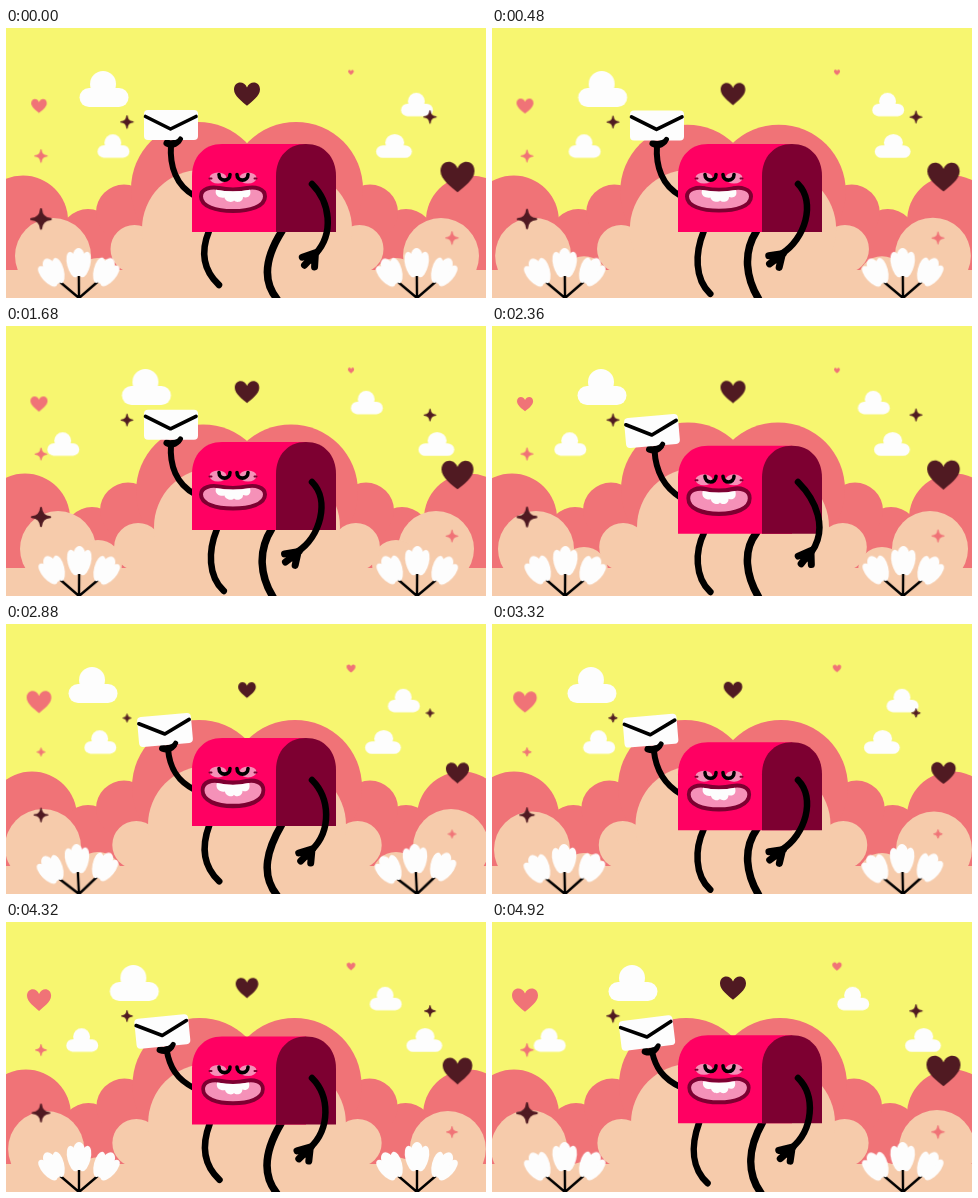
Animation of 480 by 270 pixels, one loop 4960 ms. Source, as an HTML page:

```html
<!DOCTYPE html>
<html lang="en">
<head>
<meta charset="utf-8">
<title>Mailbox with a letter</title>
<style>
  html, body { margin: 0; width: 100%; height: 100%; overflow: hidden; background: #f7f670; }
  svg { display: block; width: 100vw; height: 100vh; }
  .dark { fill: #501a22; stroke: #501a22; }
  .coral { fill: #f07377; stroke: #f07377; }
  .cream { fill: #f6cbab; }
  .white { fill: #fdfdfd; }
  .ink { fill: none; stroke: #000; stroke-linecap: round; stroke-linejoin: round; }
  .right, .left, .shrink, .grow, .sway { animation: 4960ms linear infinite; }
  .right { animation-name: right; }
  .left { animation-name: left; }
  .shrink { animation-name: shrink; }
  .grow { animation-name: grow; }
  .sway { animation-name: sway; animation-timing-function: ease-in-out; }
  @keyframes right {
    0% { transform: translateX(0); }
    33.4% { transform: translateX(43.5px); }
    47.6% { transform: translateX(12px); }
    59% { transform: translateX(-13px); }
    75.8% { transform: translateX(18.5px); }
    99.2%, 100% { transform: translateX(43px); }
  }
  @keyframes left {
    0%, 66.67% { transform: translateX(0); }
    33.33%, 100% { transform: translateX(-51px); }
  }
  @keyframes shrink {
    0% { transform: scale(1); }
    18.5% { transform: scale(.9); }
    33.9% { transform: scale(.94); }
    47.6% { transform: scale(.96); }
    58.1% { transform: scale(.68); }
    75.8% { transform: scale(.75); }
    99.2%, 100% { transform: scale(1); }
  }
  @keyframes grow {
    0% { transform: scale(.6); }
    18.5% { transform: scale(.7); }
    33.9% { transform: scale(.66); }
    47.6% { transform: scale(.62); }
    58.1% { transform: scale(.95); }
    75.8% { transform: scale(.86); }
    99.2%, 100% { transform: scale(1); }
  }
  @keyframes sway {
    0%, 18.5%, 100% { transform: rotate(-.5deg); }
    33.9%, 47.6%, 75.8% { transform: rotate(.5deg); }
    58.1% { transform: rotate(-3deg); }
  }
</style>
</head>
<body>
<svg viewBox="0 0 480 270" preserveAspectRatio="none">
  <defs>
    <path id="heart" stroke="none" d="M0 .9C-.35 .6-1 .15-1-.35C-1-1-.22-1.08 0-.5C.22-1.08 1-1 1-.35C1 .15 .35 .6 0 .9Z"/>
    <path id="star" stroke-width=".2" stroke-linejoin="round" d="M0-.9Q.06-.06 .9 0Q.06 .06 0 .9Q-.06 .06-.9 0Q-.06-.06 0-.9Z"/>
    <g id="cloud">
      <rect x="-24.5" y="-1" width="49" height="19" rx="9.5"/>
      <circle cx="-1" cy="-5" r="13"/>
    </g>
    <g id="tulip">
      <ellipse rx="7" ry="14"/>
      <ellipse cx="-6.5" cy="1" rx="5.5" ry="13" transform="rotate(-14)"/>
      <ellipse cx="6.5" cy="1" rx="5.5" ry="13" transform="rotate(14)"/>
      <circle cy="5" r="9"/>
    </g>
    <g id="bunch">
      <path class="ink" stroke-width="2.4" d="M0 0V-22M0 0L-21-18M0 0L21-18"/>
      <use href="#tulip" y="-36"/>
      <use href="#tulip" transform="translate(-27 -27) rotate(-28)"/>
      <use href="#tulip" transform="translate(27 -27) rotate(28)"/>
    </g>
    <g id="back">
      <circle id="b0" r="45"/><circle id="b1" r="28"/><circle id="b2" r="28"/><circle id="b3" r="67"/>
    </g>
    <g id="front">
      <circle id="c0" r="38"/><circle id="c1" r="24"/><circle id="c2" r="24"/><circle id="c3" r="59"/>
    </g>
  </defs>

  <rect width="480" height="270" fill="#f7f670"/>
  <g class="coral" style="stroke:none">
    <use href="#back"/><use href="#back" transform="matrix(-1 0 0 1 482 0)"/>
    <rect y="208" width="480" height="62"/>
  </g>
  <g class="cream">
    <use href="#front"/><use href="#front" transform="matrix(-1 0 0 1 482 0)"/>
    <rect x="132" y="222" width="218" height="48"/>
    <rect x="186" y="190" width="110" height="80"/>
    <rect y="242" width="480" height="28"/>
  </g>

  <g class="white">
    <g transform="translate(98 61)"><use class="right" href="#cloud"/></g>
    <g class="right"><use href="#cloud" transform="translate(388 118) scale(-.73 .66)"/></g>
    <g class="left"><use href="#cloud" transform="translate(107.5 118) scale(.65)"/></g>
    <g class="left"><use href="#cloud" transform="translate(411 76.5) scale(.65)"/></g>
  </g>
  <g id="sparks"></g>
  <g class="white">
    <g transform="translate(73 270)"><use class="sway" href="#bunch"/></g>
    <g transform="translate(411 270)"><use class="sway" href="#bunch"/></g>
  </g>

  <path id="legL" class="ink" stroke-width="6.5"/>
  <path id="legR" class="ink" stroke-width="7.5"/>
  <path id="armL" class="ink" stroke-width="6"/>
  <g id="letter">
    <path class="ink" stroke-width="7" d="M161 115Q167 118 172 113"/>
    <rect class="white" x="138" y="82" width="54" height="30" rx="4"/>
    <path class="ink" stroke-width="3.6" d="M139.5 88.5L164.5 101L190 88.5"/>
    <path class="ink" stroke-width="5" d="M166 115Q172 115 174.5 111"/>
  </g>

  <g id="body">
    <path fill="#ff0062" d="M186 204V148C186 129 198 116 216 116H300V204Z"/>
    <path fill="#7d0031" d="M270 204V148C270 129 282 116 300 116C318 116 330 129 330 148V204Z"/>
    <g fill="#f591b8">
      <ellipse cx="212" cy="150" rx="8.5" ry="5.5"/>
      <ellipse cx="242" cy="150" rx="8.5" ry="5.5"/>
    </g>
    <path class="ink" style="stroke:#7d0031" stroke-width="2" d="M203.5 150.5H205.500M248.500 150.500H250.500"/>
    <path class="ink" stroke-width="3.6" d="M213 146.500C213 154 224 154 224 146.500M231 146.500C231 154 242 154 242 146.500"/>
    <g id="mouth">
      <path fill="#f591b8" stroke="#7d0031" stroke-width="4" d="M-32-2C-32-10-22-12-14-10.500Q0-7.500 14-10.500C22-12 32-10 32-2C32 8 17 12.500 0 12.500C-17 12.500-32 8-32-2Z"/>
      <path class="white" d="M-17-8.700Q0-5.700 17-8.700C19-2 14 0 10-1.500C10 4 3 4.500 1 2C-1 5-8 3-8.500-1C-12 0-19-2-17-8.700Z"/>
    </g>
  </g>

  <path id="armR" class="ink" stroke-width="6.5"/>
  <path id="hand" class="ink" stroke-width="7" d="M4-7L-9-3M3-5L-7 5M4-4L3 7M5-7L0 0"/>
</svg>
<script>
const LOOP = 4960, STEP = 40, BEAT = LOOP / 7, TAU = Math.PI * 2;
const TIMES = [0, 920, 1680, 2360, 2880, 3760, 4920];
const $ = id => document.getElementById(id);
const set = (id, attrs) => {
  for (const k in attrs) $(id).setAttribute(k, attrs[k]);
};

// Smooth curve through the values at TIMES, without overshoot.
function track(...v) {
  const slope = i => (v[i + 1] - v[i]) / (TIMES[i + 1] - TIMES[i]);
  const tangent = i => {
    if (i === 0 || i === v.length - 1) return 0;
    const a = slope(i - 1), b = slope(i);
    return a * b <= 0 ? 0 : 2 * a * b / (a + b);
  };
  return t => {
    let i = 0;
    while (i < v.length - 2 && t > TIMES[i + 1]) i++;
    const w = TIMES[i + 1] - TIMES[i];
    const u = Math.min(1, (t - TIMES[i]) / w), n = 1 - u;
    return v[i] * n * n * (1 + 2 * u) + v[i + 1] * u * u * (3 - 2 * u)
      + w * u * n * (tangent(i) * n - tangent(i + 1) * u);
  };
}

const hillX = track(17, 26, 19, 20, 26, 18, 22);
const bumpX = track(118, 126, 122, 119, 118, 117, 120);
const peakX = track(192, 198, 197, 196, 193, 193, 194);
const peakY = track(161, 166, 165.5, 163.5, 163, 163, 163);
const knollX = track(47, 36, 52, 44, 37, 43, 37);
const knollY = track(228, 227, 223, 223, 223, 228, 226);
const moundY = track(254, 249, 238, 245, 252, 254, 264);
const domeX = track(195, 200, 207, 204, 201, 204, 198);
const letterX = track(0, 0, 0, -5, -6, -7, -10);
const letterY = track(0, 1, 1.8, 8, 9, 10.5, 14);
const tilt = track(0, 0, 0, -5, -5, -4.5, -7);
const grin = track(1, 1, 1, .96, .95, .94, .93);
const grinY = track(1, .95, .96, 1.08, 1.08, .96, 1);

function hills(t) {
  const b = bumpX(t), dome = domeX(t);
  const at = (id, cx, cy) => set(id, { cx, cy });
  at('b0', hillX(t), 192.5);
  at('b1', b - 36, 209);
  at('b2', b, 184.5);
  at('b3', peakX(t), peakY(t));
  at('c0', knollX(t), knollY(t));
  at('c1', 92, moundY(t));
  at('c2', 70 + dome * .3, 221);
  at('c3', dome, 201);
}

function character(t) {
  const beat = t / BEAT;
  const bob = t < 1950 ? 0 : 1.3 - 4 * Math.cos(TAU * (beat + .03));
  const bend = 6 - 2 * Math.cos(Math.PI * beat) - 4 * Math.cos(TAU * beat);
  const swing = 16 - 18 * Math.sin(TAU * (beat / 2 - .03));
  const y = 203 + bob, dx = letterX(t), dy = letterY(t);

  set('body', { transform: `translate(0 ${bob})` });
  set('mouth', { transform: `translate(227 170.5) scale(${grin(t)} ${grinY(t)})` });

  const l = 203 + bend;
  set('legL', { d: `M${l} ${y}C${l - 9} 225 ${198 + bend * .5} ${243 + bend * .9} ${213 + bend * .6} ${257 + bend}` });
  const r = 276 - bend * 1.3;
  set('legR', { d: `M${r} ${y}C${r - 14} 225 254 250 ${271 - bend * .5} 271` });

  set('armL', { d: `M189 ${168 + bob}C170 ${158 + bob * .6} 163.5 ${138 + dy * .5} ${165 + dx * .5} ${117 + dy * .9}` });
  set('letter', { transform: `translate(${dx} ${dy}) rotate(${tilt(t)} 165 97)` });

  const hx = 286 + swing;
  set('armR', { d: `M306 156C324 174 ${314 + swing * .75} ${211 - swing * .3} ${hx + 4} 226` });
  set('hand', { transform: `translate(${hx} 232) rotate(${(16 - swing) * .5})` });
}

// [shape, colour, pulse, x, y, half width]
const SPARKS = [
  ['heart', 'dark', 'shrink', 241, 66, 13],
  ['heart', 'dark', 'shrink', 451.5, 149, 17],
  ['heart', 'coral', 'grow', 33, 78, 13],
  ['heart', 'coral', 'grow', 345, 44.5, 4.7],
  ['star', 'dark', 'shrink', 121, 94, 6.7],
  ['star', 'dark', 'shrink', 424, 89, 6.7],
  ['star', 'dark', 'shrink', 35, 191, 10.8],
  ['star', 'coral', 'shrink', 35, 128, 6.7],
  ['star', 'coral', 'shrink', 446, 210, 6.7],
];
$('sparks').innerHTML = SPARKS.map(([shape, colour, pulse, x, y, size]) =>
  `<g transform="translate(${x} ${y}) scale(${size})"><g class="${pulse}"><use class="${colour}" href="#${shape}"/></g></g>`
).join('');

let start;
function draw(now) {
  start ??= now;
  const t = Math.floor((now - start) % LOOP / STEP) * STEP;
  hills(t);
  character(t);
  requestAnimationFrame(draw);
}
hills(0);
character(0);
requestAnimationFrame(draw);
</script>
</body>
</html>
```
